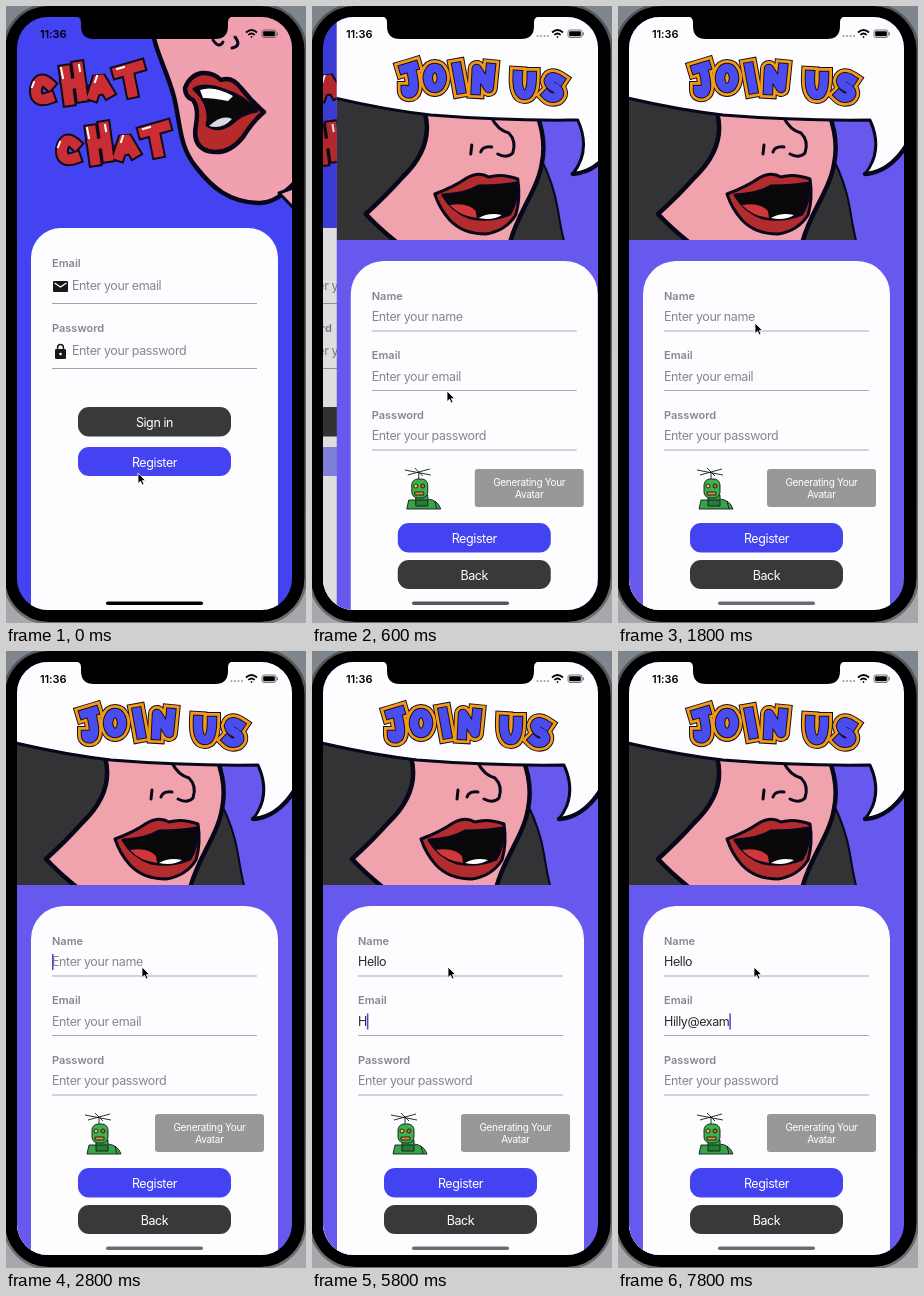
An HTML page that plays this animation: 300 by 617 pixels, repeating every 8000 ms.

```html
<!DOCTYPE html>
<html lang="en">
<head>
<meta charset="utf-8">
<title>Chat sign-up</title>
<style>
html, body { margin: 0; width: 100%; height: 100%; overflow: hidden; background: #9d9ea2; }
svg { display: block; width: 100%; height: 100%; }
text { font: 12.5px Inter, sans-serif; letter-spacing: -.4px; }
.label { font-size: 11px; font-weight: 600; letter-spacing: 0; fill: #84878d; }
.hint { fill: #85888d; }
.typed { fill: #292a2d; }
.button { fill: #fff; text-anchor: middle; }
.small { font-size: 10px; letter-spacing: -.3px; }
.clock { font-size: 11px; font-weight: 600; letter-spacing: -.1px; }
.ink { stroke: #08071a; stroke-width: 3; stroke-linejoin: round; stroke-linecap: round; }
.bold { stroke-width: 4.5; }
.fine { stroke-width: 2; }
.line { fill: none; }
</style>
</head>
<body>
<svg viewBox="0 0 300 617" preserveAspectRatio="none">
  <defs>
    <linearGradient id="desk" x2="0" y2="1">
      <stop offset="0" stop-color="#7f858c"/><stop offset="1" stop-color="#a7a8ab"/>
    </linearGradient>
    <clipPath id="screen"><rect x="11" y="11" width="275" height="593" rx="31"/></clipPath>
    <clipPath id="poster"><rect x="11" y="11" width="275" height="223"/></clipPath>
    <clipPath id="banner"><rect x="11" y="11" width="275" height="211"/></clipPath>
  </defs>
  <rect width="300" height="617" fill="url(#desk)"/>
  <rect x="-1" y="0" width="299.5" height="616" rx="44" stroke="#000" stroke-opacity=".35" stroke-width="5"/>

  <g clip-path="url(#screen)">
    <g id="signIn">
      <rect x="11" y="11" width="275" height="593" fill="#4343f2"/>
      <g clip-path="url(#banner)">
        <path class="ink bold" fill="#f0a0ae" d="M143 8C148 45 161 64 168 91C175 120 173 140 190 161C207 183 224 196 252 197C270 197 277 187 292 174V8Z"/>
        <path class="ink" fill="#f0a0ae" d="M273 187L290 181V205Q283 197 273 187Z"/>
        <path class="ink line" d="M207 34Q213 43 217 36M229 31Q236 40 226 42"/>
        <path class="ink bold" fill="#b72a2b" d="M179 82Q184 69 196 67Q207 66 215 74Q226 70 235 82Q246 96 258 106Q247 115 237 131Q222 150 202 145Q186 140 190 119Q193 102 187 94Q179 91 179 82Z"/>
        <path class="ink" fill="#0b0809" d="M188 83Q198 77 215 83Q238 90 251 105Q236 107 225 118Q211 127 201 119Q206 100 188 83Z"/>
        <path fill="#fff" d="M194 84Q208 79 227 90L222 95Q207 92 197 92Z"/>
        <path fill="#d9dbe0" d="M203 120Q216 108 226 113Q216 124 203 120Z"/>
      </g>
      <g id="chat"></g>
      <path d="M25 604V252A30 30 0 0 1 55 222H242A30 30 0 0 1 272 252V604Z" fill="#fdfcff"/>
      <path id="paleSide" fill="#fdfcff" d="M11 222H272V604H11Z" visibility="hidden"/>
      <g id="signInForm"></g>
      <path fill="#17181a" d="M48 275H61Q62 275 62 276V285Q62 286 61 286H48Q47 286 47 285V276Q47 275 48 275Z"/>
      <path class="line" stroke="#fff" stroke-width="1.2" d="M48.5 277L54.5 281L60.5 277"/>
      <rect x="49" y="343" width="11" height="10" rx="1.3" fill="#17181a"/>
      <path class="line" stroke="#17181a" stroke-width="1.5" d="M51.6 344V341.5a2.9 2.9 0 0 1 5.8 0V344"/>
      <circle cx="54.5" cy="348" r="1.3" fill="#fff"/>
    </g>
    <rect id="dim" x="11" y="11" width="275" height="593" opacity="0"/>

    <g id="signUp">
      <rect x="11" y="11" width="275" height="593" fill="#6759ee"/>
      <g clip-path="url(#poster)">
        <path fill="#333335" d="M11 80H110V234H11Z"/>
        <path class="ink fine" fill="#333335" d="M215 152Q228 178 232 203T239 238H180Z"/>
        <path class="ink bold" fill="#f0a3ad" d="M99 106C106 132 96 153 76 172Q60 190 40 208Q53 222 73 238H184C190 210 212 184 216 158Q221 134 211 108Z"/>
        <path class="ink line" d="M166 112Q172 124 183 127Q191 135 187 147Q181 153 172 148M146 139L145 148M155 146Q157 140 166 141"/>
        <path class="ink" fill="#b32c2d" d="M109 188Q128 181 141 172Q153 165 163 171Q176 167 192 173Q195 192 190 209Q180 225 160 228Q137 228 124 214Q114 203 109 188Z"/>
        <path class="ink" fill="#090708" d="M117 189Q140 188 153 180Q175 180 191 177Q192 195 184 208Q165 216 145 212Q127 206 117 189Z"/>
        <path fill="#d0363a" d="M124 199Q142 196 150 205L151 212Q134 210 124 199Z"/>
        <path fill="#fff" d="M153 212Q163 206 176 209Q167 215 153 212Z"/>
        <path class="ink" fill="#fdfcff" d="M5 5H292V133C283 151 267 167 247 168C258 154 262 136 252 114Q180 115 105 109Q60 104 5 91Z"/>
        <path class="ink line bold" d="M247 168C267 167 283 151 292 133"/>
      </g>
      <g id="join"></g>
      <path d="M25 604V288A33 33 0 0 1 58 255H239A33 33 0 0 1 272 288V604Z" fill="#fdfcff"/>
      <g id="signUpForm"></g>
      <rect x="149" y="463" width="109" height="38" rx="3" fill="#98989a"/>
      <text class="button small" x="203.5" y="480">Generating Your</text>
      <text class="button small" x="203.5" y="492">Avatar</text>
      <g stroke="#141c14" stroke-width=".9">
        <path class="line" d="M93 473V466M79 464L105 469M82 469L104 463M89 462L97 470"/>
        <path fill="#38a34a" d="M81 503L83 494H90V489H102V493Q112 494 115 503Z"/>
        <rect x="86" y="473" width="16" height="19" rx="6" fill="#3fb04f"/>
        <path fill="#267d37" d="M90 494H102V500H90ZM109 495L111 503"/>
        <circle cx="90" cy="480" r="2" fill="#f0cd36"/><circle cx="97" cy="480" r="2" fill="#e9543a"/>
        <path fill="#e38d35" d="M89 486H98V489H89Z"/>
      </g>
      <rect id="caret" width="1.5" height="16" fill="#4747d8"/>
    </g>
    <rect id="home" x="100" y="595.5" width="97" height="3.5" rx="1.75"/>
  </g>

  <path d="M69 10H228Q222 11 222 16V20Q222 33 209 33H88Q75 33 75 20V16Q75 11 69 10Z"/>
  <text class="clock" x="34" y="32">11:36</text>
  <g id="signal" fill="#99999e">
    <circle cx="225.5" cy="30" r="1"/><circle cx="229" cy="30" r="1"/><circle cx="232.5" cy="30" r="1"/><circle cx="236" cy="30" r="1"/>
  </g>
  <g class="line" stroke="#000" stroke-width="1.7">
    <path d="M240 26.5Q245.5 21.5 251 26.5M242.3 29Q245.5 26 248.7 29"/>
    <path d="M244.8 31H246.2"/>
  </g>
  <rect x="256" y="24" width="14" height="7.5" rx="2" fill="none" stroke="#55555a" stroke-width=".8"/>
  <rect x="257.2" y="25.2" width="11.6" height="5.1" rx="1"/>
  <path d="M271.2 26.3V29.3" stroke="#55555a"/>
  <path id="pointer" d="M0 0V10.5L2.5 8.3L4.2 12L6 11.2L4.4 7.6H7.6Z" stroke="#fff" stroke-width=".8"/>
</svg>

<script>
const $ = id => document.getElementById(id);

function add(parent, tag, attrs, content = '') {
  const node = document.createElementNS('http://www.w3.org/2000/svg', tag);
  for (const key in attrs) node.setAttribute(key, attrs[key]);
  node.textContent = content;
  return parent.appendChild(node);
}

// Offsets are measured from the baseline of the label.
const roomy = { indent: 20, hintDrop: 23, ruleDrop: 36.5, rule: '#a4a5ab' };
const compact = { indent: 0, hintDrop: 21.8, ruleDrop: 31.5, rule: '#a5a9bd' };

function field(form, name, y, { indent, hintDrop, ruleDrop, rule }) {
  const hint = `Enter your ${name.toLowerCase()}`;
  add(form, 'text', { class: 'label', x: 46, y }, name);
  add(form, 'path', { d: `M46 ${y + ruleDrop}H251`, stroke: rule });
  return { node: add(form, 'text', { class: 'hint', x: 46 + indent, y: y + hintDrop }, hint), hint, y };
}

function button(form, title, y, height, fill) {
  const group = add(form, 'g', {});
  add(group, 'rect', { x: 72, y, width: 153, height, rx: 11, fill });
  add(group, 'text', { class: 'button', x: 148.5, y: y + height / 2 + 5 }, title);
  return group;
}

// Stacked strokes, widest first, turn a skeleton into outlined lettering.
function lettering(parent, strokes, layers, attrs) {
  const group = add(parent, 'g', { fill: 'none', ...attrs });
  for (const [stroke, width] of layers)
    for (const d of strokes) add(group, 'path', { d, stroke, 'stroke-width': width });
  return group;
}

const chatStrokes = [
  'M43 78Q33 69 30 83Q29 97 43 92',
  'M59 65L63 94M72 61L76 90M61 79L74 76',
  'M87 89L93 71L102 86M90 84L98 82',
  'M112 66L133 60M122 66L126 86'
];
const joinStrokes = [
  'M78 63L88 60M85 62Q91 85 85 87Q80 88 80 84',
  'M109 62a7 10 0 1 0 .1 0Z',
  'M131 61L135 83',
  'M150 84L151 63L163 82L165 62',
  'M192 69Q191 89 199 89Q206 89 206 70',
  'M234 74Q225 68 223 75Q224 80 230 82Q236 87 231 91Q225 93 221 89'
];
const chatLayers = [['#100a18', 14], ['#cb2d35', 10]];
const joinLayers = [['#17101c', 18], ['#f39b18', 16], ['#17101c', 10.5], ['#4b4cf0', 8.5]];

for (const transform of ['', 'translate(26 60)']) {
  const word = lettering($('chat'), chatStrokes, chatLayers, { transform, 'stroke-linecap': 'square', 'stroke-linejoin': 'bevel' });
  add(word, 'path', { d: 'M55 62L57 72M89 76L91 70M111 63L118 61M26 81L28 76M73 59L74 65', stroke: '#fff', 'stroke-width': 2 });
}
lettering($('join'), joinStrokes, joinLayers, { 'stroke-linecap': 'square', 'stroke-linejoin': 'round' });

const signInForm = $('signInForm'), signUpForm = $('signUpForm');
field(signInForm, 'Email', 261, roomy);
field(signInForm, 'Password', 326, roomy);
button(signInForm, 'Sign in', 401, 29.5, '#38393b');
const register = button(signInForm, 'Register', 441, 29, '#4343f2');

const nameField = field(signUpForm, 'Name', 293.5, compact);
const emailField = field(signUpForm, 'Email', 353, compact);
field(signUpForm, 'Password', 412.5, compact);
button(signUpForm, 'Register', 517, 29.5, '#4343f2');
button(signUpForm, 'Back', 554, 29, '#38393b');

const LOOP = 8000, STEP = 200, WIDTH = 275;
const slide = [[0, 0], [400, .5636], [600, .95], [800, 1]];
const pointerPath = [[0, 132, 467], [600, 135, 385], [800, 137, 317], [2600, 136, 316]];
const nameKeys = [4200, 4400, 4600, 4800, 5000];
const emailKeys = [5800, 6000, 6200, 6400, 6600, 7000, 7200, 7400, 7600, 7800];
const focusName = 2600, focusEmail = 5400;

const latest = (table, t) => table.filter(row => row[0] <= t).pop();

function fill(input, text, keys, t) {
  const typed = text.slice(0, keys.filter(key => key <= t).length);
  input.node.textContent = typed || input.hint;
  input.node.setAttribute('class', typed ? 'typed' : 'hint');
  return typed ? input.node.getComputedTextLength() : 0;
}

function placeCaret(t, nameWidth, emailWidth) {
  const inEmail = t >= focusEmail;
  const input = inEmail ? emailField : nameField;
  const idle = t > 2800 && t < nameKeys[0];
  const visible = t >= focusName && (!idle || (t - focusName) % 1000 < 500);
  $('caret').setAttribute('x', 46 + (inEmail ? emailWidth : nameWidth));
  $('caret').setAttribute('y', input.y + 9.5);
  $('caret').setAttribute('opacity', visible ? 1 : 0);
}

function draw(now) {
  const t = Math.floor(now % LOOP / STEP) * STEP;
  const progress = latest(slide, t)[1];
  const [, x, y] = latest(pointerPath, t);

  $('signIn').setAttribute('transform', `translate(${-.3 * WIDTH * progress})`);
  $('signUp').setAttribute('transform', `translate(${WIDTH * (1 - progress)})`);
  $('paleSide').setAttribute('visibility', progress ? 'visible' : 'hidden');
  $('dim').setAttribute('opacity', .13 * progress);
  register.setAttribute('opacity', t >= 200 ? .58 : 1);
  $('home').setAttribute('fill', progress === 0 ? '#000' : progress < 1 ? '#55555a' : '#6c6c70');
  $('signal').setAttribute('opacity', progress ? 1 : .35);
  $('pointer').setAttribute('transform', `translate(${x} ${y})`);

  const nameWidth = fill(nameField, 'Hello', nameKeys, t);
  const emailWidth = fill(emailField, 'Hilly@exam', emailKeys, t);
  placeCaret(t, nameWidth, emailWidth);
  requestAnimationFrame(draw);
}
draw(performance.now());
</script>
</body>
</html>
```
